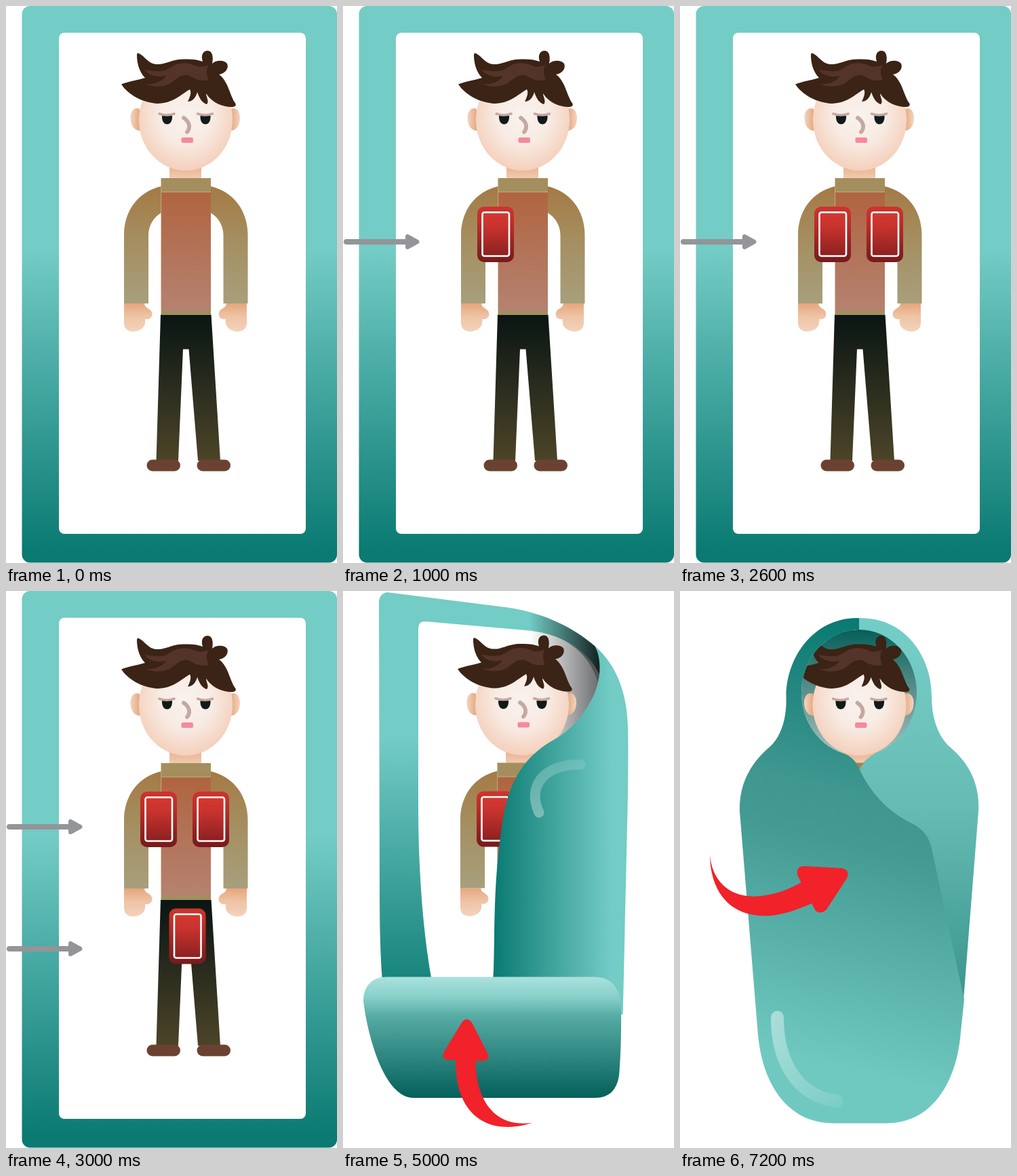
An HTML page that plays this animation: 488 px wide and 822 px high, repeating every 8000 ms.

```html
<!DOCTYPE html>
<html lang="en">
<head>
<meta charset="utf-8">
<title>Wrapping steps</title>
<style>
html, body { margin: 0; width: 100%; height: 100%; overflow: hidden; background: #fff; }
svg { display: block; width: 100%; height: 100%; }
.red { fill: #f12229; }
.shine { fill: none; stroke-linecap: round; }
</style>
</head>
<body>
<svg viewBox="0 0 488 822">
<defs>
  <linearGradient id="mat" gradientUnits="userSpaceOnUse" x1="0" y1="360" x2="0" y2="805">
    <stop stop-color="#73ccc5"/><stop offset="1" stop-color="#0a7a72"/></linearGradient>
  <linearGradient id="back1" href="#mat" y1="300" y2="800"/>
  <linearGradient id="back2" href="#mat" y1="215" y2="625"/>
  <linearGradient id="roll" href="#mat" x1="395" y1="0" x2="222" y2="0"/>
  <linearGradient id="shade" gradientUnits="userSpaceOnUse" x1="275" y1="0" x2="380" y2="0">
    <stop stop-color="#000" stop-opacity="0"/><stop offset="1" stop-color="#000" stop-opacity=".85"/></linearGradient>
  <linearGradient id="shadeIn" gradientUnits="userSpaceOnUse" x1="275" y1="0" x2="380" y2="0">
    <stop stop-color="#58595b" stop-opacity="0"/><stop offset="1" stop-color="#58595b" stop-opacity=".9"/></linearGradient>
  <linearGradient id="flap" x2="0" y2="1">
    <stop stop-color="#abe1dc"/><stop offset=".17" stop-color="#86d0c9"/>
    <stop offset=".32" stop-color="#57aca5"/><stop offset="1" stop-color="#04605a"/></linearGradient>
  <linearGradient id="wrapR" gradientUnits="userSpaceOnUse" x1="0" y1="90" x2="0" y2="600">
    <stop stop-color="#73ccc5"/><stop offset=".45" stop-color="#65bcb4"/><stop offset="1" stop-color="#3b958e"/></linearGradient>
  <linearGradient id="wrapL" gradientUnits="userSpaceOnUse" x1="310" y1="60" x2="150" y2="720">
    <stop stop-color="#0a7a72"/><stop offset=".36" stop-color="#3f9790"/>
    <stop offset=".46" stop-color="#429a93"/><stop offset=".95" stop-color="#70c9c1"/></linearGradient>
  <linearGradient id="hood" x2="0" y2="1">
    <stop stop-color="#075f59"/><stop offset=".5" stop-color="#5d918e"/><stop offset="1" stop-color="#a9c0be"/></linearGradient>
  <linearGradient id="shineA" gradientUnits="userSpaceOnUse" x1="245" y1="680" x2="320" y2="755">
    <stop stop-color="#fff" stop-opacity=".34"/><stop offset="1" stop-color="#fff" stop-opacity=".12"/></linearGradient>
  <linearGradient id="shineB" href="#shineA" x1="285" y1="330" x2="355" y2="255"/>
  <linearGradient id="shineC" gradientUnits="userSpaceOnUse" x1="143" y1="625" x2="235" y2="760">
    <stop stop-color="#fff" stop-opacity=".44"/><stop offset="1" stop-color="#fff" stop-opacity=".08"/></linearGradient>
  <radialGradient id="face" cx=".5" cy=".45" r=".56">
    <stop stop-color="#f9f2ee"/><stop offset=".5" stop-color="#f8ebe4"/><stop offset="1" stop-color="#f4cfba"/></radialGradient>
  <linearGradient id="earFill"><stop stop-color="#f5d5be"/><stop offset="1" stop-color="#e2a67d"/></linearGradient>
  <linearGradient id="skin" x2="0" y2="1"><stop stop-color="#e6a67d"/><stop offset=".45" stop-color="#eec3a4"/><stop offset="1" stop-color="#f3d3bc"/></linearGradient>
  <linearGradient id="neckFill" gradientUnits="userSpaceOnUse" x1="0" y1="234" x2="0" y2="262"><stop stop-color="#e8ae88"/><stop offset="1" stop-color="#f5d6c1"/></linearGradient>
  <linearGradient id="sleeve" x2="0" y2="1"><stop stop-color="#a47a45"/><stop offset=".45" stop-color="#a58e60"/><stop offset="1" stop-color="#a79f7c"/></linearGradient>
  <linearGradient id="vest" x2="0" y2="1"><stop stop-color="#b06440"/><stop offset="1" stop-color="#b58270"/></linearGradient>
  <linearGradient id="trousers" x2="0" y2="1"><stop stop-color="#0a1512"/><stop offset=".3" stop-color="#1d231a"/><stop offset="1" stop-color="#4c4428"/></linearGradient>
  <linearGradient id="padOut" x2="0" y2="1"><stop stop-color="#cf342e"/><stop offset=".3" stop-color="#bd2d29"/><stop offset="1" stop-color="#761a1c"/></linearGradient>
  <linearGradient id="padIn" x2="0" y2="1"><stop stop-color="#d43831"/><stop offset=".3" stop-color="#ca332e"/><stop offset="1" stop-color="#8a2120"/></linearGradient>
  <clipPath id="hoodClip"><ellipse cx="264" cy="150" rx="85" ry="93"/></clipPath>
  <clipPath id="upper"><rect width="488" height="625"/></clipPath>

  <path id="sleeveL" d="M229 266C195 274 174 302 174 338V439H210V338C210 325 217 312 229 305Z" fill="url(#sleeve)"/>
  <path id="hand" d="M174 439H204C205 446 210 445 214 450C218 457 213 464 205 462C207 474 198 480 187 480.500C178 480 174 475 174 467Z" fill="url(#skin)"/>
  <path id="ear" d="M197 152C188 148 183 157 183.500 166C184 178 190 184 198 184Z" fill="url(#earFill)"/>
  <g id="eye">
    <path d="M230 162H245C245.500 170 242 174.500 237.500 174.500S229.500 170 230 162Z" fill="#101a19"/>
    <path d="M226 159Q237 163 248 159" fill="none" stroke="#c5a8a2" stroke-width="3.600" stroke-linecap="round"/>
  </g>
  <g id="pad">
    <rect x="198" y="296" width="54" height="82" rx="10" fill="url(#padOut)"/>
    <rect x="205.500" y="304.500" width="39.500" height="64.500" rx="3" fill="url(#padIn)" stroke="#fff" stroke-width="2.600"/>
  </g>
  <g id="pointer" fill="#939598" stroke="#939598" stroke-linecap="round" stroke-linejoin="round">
    <path d="M5 348H95" stroke-width="8"/>
    <path d="M95 340V356L109.500 348Z" stroke-width="6"/>
  </g>

  <g id="head">
    <use href="#ear"/><use href="#ear" transform="matrix(-1 0 0 1 528.500 0)"/>
    <ellipse cx="265" cy="168" rx="69" ry="75" fill="url(#face)"/>
    <use href="#eye"/><use href="#eye" x="56.500"/>
    <path d="M262 165C268 169 271 175 270 180Q269 184 267 186" fill="none" stroke="#c5a8a2" stroke-width="5.800" stroke-linecap="round"/>
    <rect x="258.500" y="194" width="17.500" height="8" rx="2.500" fill="#f58a9c"/>
    <path fill="#3b2315" d="M195 69.500C205 74 209 85 222 86C236 87 244 78 263 78.500C273 78 282 79 290 82C287 74 290 66 297 66C304 66 306 74 304 85C309 80 321 79 326 85C329 92 323 100 314 101C328 111 330 133 338.500 144Q340 149 333 149C319 149 304 143 295 129C295 135 300 140 296 145C289 143 285 136 282 127C280 135 275 141 268 141C271 135 274 128 271 123C256 132 247 143 224 144C202 143 180 131 170 115.500C181 111 193 110 205 106C196 97 193 83 193 73Q193 69 195 69.500Z"/>
    <path fill="#543328" d="M204 94C218 96 231 99 242 91C254 82 268 83 279 88C286 91 292 89 299 87C294 93 296 104 299 109C288 112 278 108 271 103C258 99 250 109 243 114C233 120 217 120 206 115C219 116 230 112 236 103C224 106 211 103 204 94Z"/>
  </g>
  <g id="trunk">
    <rect x="241" y="225" width="47" height="32" fill="url(#neckFill)"/>
    <use href="#hand"/><use href="#hand" transform="matrix(-1 0 0 1 529 0)"/>
    <use href="#sleeveL"/><use href="#sleeveL" transform="matrix(-1 0 0 1 530.500 0)"/>
    <rect x="228.500" y="254" width="73.500" height="201.500" fill="#a58e5e"/>
    <rect x="229" y="275" width="73" height="174.500" fill="url(#vest)"/>
    <path d="M228.700 266V305M229 274.500H302" fill="none" stroke="#d0b793" stroke-width=".7"/>
  </g>
  <g id="legs">
    <path d="M228 455.500H302.500L316 671H283L269.500 506.500H261L254 671H221.500Z" fill="url(#trousers)"/>
    <rect x="207.500" y="669.500" width="49.500" height="17" rx="8.500" fill="#6b4231"/>
    <rect x="281.500" y="669.500" width="49.500" height="17" rx="8.500" fill="#6b4231"/>
  </g>
  <g id="bust"><use href="#trunk"/><use href="#head"/><use href="#pad"/></g>
  <path id="rollShape" fill="url(#roll)" d="M372 82C382 103 381 135 365 163C352 186 338 204 310 220C262 247 241 290 234 348C222 430 224 490 222 560C218 620 214 650 214.500 690C216 740 224 771 243 779.500C262 787 300 789 340 794C370 798 381 804 379.500 811Q379 815 370 817.500L380 817.500C400 817 408 800 409 775C411 700 417 440 420 300C420 270 421 240 420 200C419 155 405 110 372 82Z"/>
  <path id="rimTop" d="M240 24C300 32 345 58 372 82L400 150H380C367 85 320 62 270 58L240 55Z"/>
  <path id="shadeHole" d="M270 58C320 62 360 85 379 125L375 230H270Z" fill="url(#shadeIn)"/>
</defs>

<g data-show="0 4">
  <rect x="23.500" y="0" width="464.500" height="821.500" rx="12" fill="url(#mat)"/>
  <rect x="78" y="39.500" width="364" height="739.500" rx="8" fill="#fff"/>
  <use href="#legs"/><use href="#trunk"/><use href="#head"/>
</g>
<g data-show="1 4"><use href="#pointer"/><use href="#pad"/></g>
<g data-show="2 4"><use href="#pad" x="77"/></g>
<g data-show="3 4"><use href="#pointer" y="180"/><use href="#pad" x="42.500" y="172.500"/></g>

<g data-show="4 5">
  <path fill="url(#back1)" d="M53.500 17C53.500 7 60 1 70 3L240 24C300 32 345 58 372 82L400 150V800L380 817.500L68 821.500Q55 821.500 55 808Z"/>
  <path fill="#fff" d="M111.500 56Q112 44 123 45L270 58C320 62 360 85 379 125L385 250V779H123Q111.500 779 111.500 768Z"/>
  <use href="#rimTop" fill="url(#shade)"/>
  <use href="#shadeHole"/>
  <path fill="url(#shade)" d="M240 779H385V817.500L240 819.500Z"/>
  <use href="#bust" x="-.5"/>
  <use href="#rollShape"/>
  <path class="shine" d="M251 681C235 715 255 748 313 750" stroke="url(#shineA)" stroke-width="15"/>
  <path class="red" d="M447 325C460 370 457 405 420 427C400 438 375 441 355 441V451Q354 462 344 459L299 432Q291 425 299 418L344 394Q355 391 355.500 401V411.500C415 410 455 385 447 325Z"/>
</g>

<g data-show="5 6">
  <path fill="url(#back2)" d="M53 17C53 7 60 0 70 2.500L240 24C300 32 345 58 372 82L400 150V600H60C54 540 54 480 54 430Z"/>
  <path fill="#fff" d="M111 56Q111 44 122 45L270 58C320 62 360 85 379 125L385 250V600H136C118 520 111 410 111 320Z"/>
  <use href="#rimTop" fill="url(#shade)"/>
  <use href="#shadeHole"/>
  <use href="#bust" x="-1" y="-.5"/>
  <g clip-path="url(#upper)"><use href="#rollShape"/></g>
  <path class="shine" d="M350 256C300 255 270 285 289 327" stroke="url(#shineB)" stroke-width="15"/>
  <path fill="url(#flap)" d="M64 569.500H370C395 569.500 408 585 410 612C410.500 660 409 690 407 715Q402 748 372 748H104C60 748 36 655 30 605C30 582 44 569.500 64 569.500Z"/>
  <path class="red" d="M279 785C215 805 165 775 166 692H154Q144 690 149 680L175 637Q182 627 190 637L213 682Q217 692 207 693.500H195.500C196 740 215 793 279 785Z"/>
</g>

<g data-show="6 8">
  <path fill="url(#wrapR)" d="M264 40C330 38 371 95 371 155C371 195 385 220 400 232C430 258 442 290 440 325L418 603L264 500Z"/>
  <ellipse cx="264" cy="150" rx="85" ry="93" fill="url(#hood)"/>
  <path d="M240 237H288V239.500C276 247 268 253 264 264C256 254 250 247 240 241Z" fill="url(#neckFill)"/>
  <path d="M256 253.500H271L264 264Z" fill="#a58350"/>
  <g clip-path="url(#hoodClip)"><use href="#head" x="-.5"/></g>
  <path fill="url(#wrapL)" d="M264 40C200 38 157 95 156.500 155C158 195 145 220 130 232C100 258 87 290 88 325L115 655C122 730 160 785 225 785.500H305C375 785 409 720 414 650L419 603L372 385Q368 355 340 342C305 325 280 295 266 266C260 251 252 243 240 239.200A85 93 0 0 1 264 57Z"/>
  <path class="shine" d="M143.500 629C143 690 170 745 231 753" stroke="url(#shineC)" stroke-width="19"/>
  <path class="red" d="M44 390C48 430 75 455 120 450C145 447 165 438 178.500 430L173 419Q171 406 183 406L239 409Q251 412 246 424L216 470Q208 478 200 472L194 461C170 472 145 479.500 125 479.500C70 479 45 440 44 390Z"/>
</g>
</svg>
<script>
const LOOP = 8000, STEP = 1000;
const layers = [...document.querySelectorAll('[data-show]')].map(el => {
  const [from, to] = el.dataset.show.split(' ').map(Number);
  return { el, from, to };
});
const start = performance.now();

function draw(now) {
  const step = Math.floor(Math.max(0, now - start) % LOOP / STEP);
  for (const { el, from, to } of layers)
    el.style.display = step >= from && step < to ? '' : 'none';
  requestAnimationFrame(draw);
}
draw(start);
</script>
</body>
</html>
```
